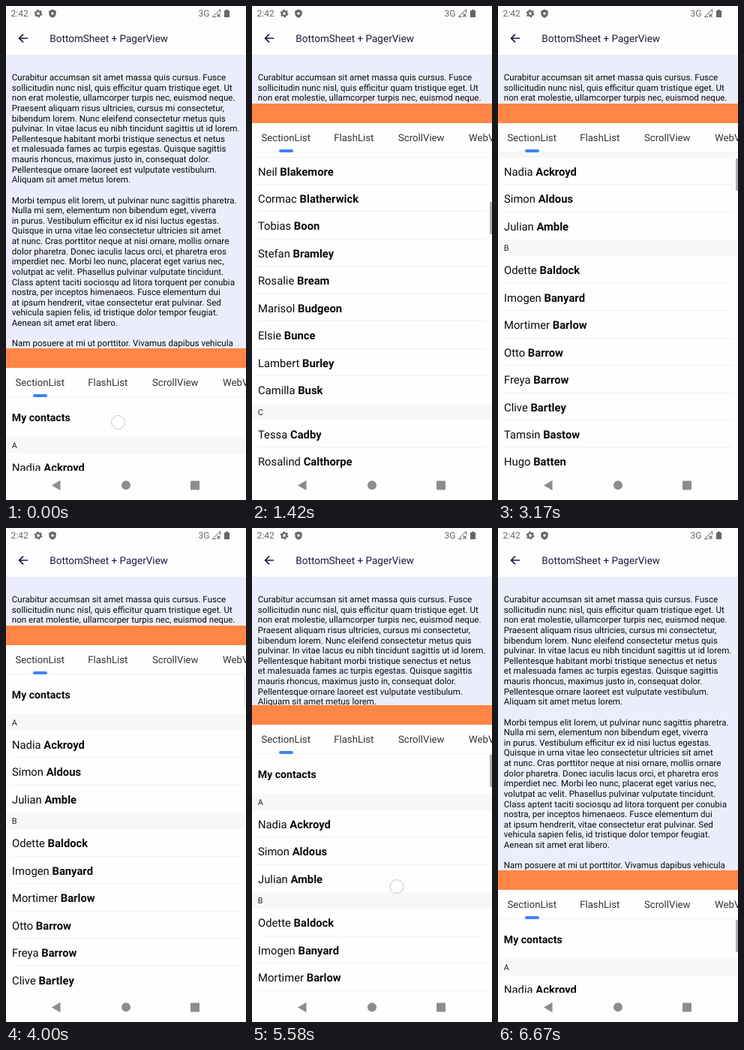
These frames come from a looping animation (320 by 658 pixels, 6.83 s). An HTML page:

```html
<!DOCTYPE html>
<html lang="en">
<head>
<meta charset="utf-8">
<title>BottomSheet + PagerView</title>
<style>
  html, body { margin: 0; width: 100%; height: 100%; overflow: hidden; background: #fefefe; }
  body { font-family: Roboto, sans-serif; color: #0a0a0a; text-rendering: geometricPrecision; }
  #stage { position: relative; width: 320px; height: 658px; overflow: hidden; }
  #stage > * { position: absolute; left: 0; }
  #top { top: 0; width: 320px; height: 65px; background: #fdfdfe; border-bottom: 1px solid #e9e9f3; }
  #page { top: 66px; width: 320px; height: 553px; background: #ebedfc; }
  #lorem { position: absolute; left: 7.8px; top: 23px; font-size: 11.6px; line-height: 13.62px; white-space: pre; }
  #sheet { top: 0; width: 320px; height: 619px; background: #fefefe; }
  #grip { height: 26px; background: #ff8645; }
  #tabs { position: relative; height: 38px; border-bottom: 1px solid #f0f0f0; }
  #tabs span { position: absolute; top: 0; line-height: 42px; font-size: 13.2px; color: #333; white-space: nowrap; }
  #tabs i { position: absolute; left: 36px; top: 35px; width: 19px; height: 4px; border-radius: 2px; background: #3c83f6; }
  #view { position: relative; height: 424px; overflow: hidden; }
  #list { position: absolute; left: 0; top: 0; width: 320px; }
  #list div { box-sizing: border-box; white-space: pre; }
  .title { height: 53px; padding-left: 7.8px; font: bold 14.1px/56px Roboto, sans-serif; }
  .letter { height: 22px; padding-left: 7.8px; background: #f7f7f7; font-size: 10.9px; line-height: 23px; color: #222; }
  .row { height: 36.45px; margin: 0 7px 0 8px; font-size: 14.8px; line-height: 38.4px; }
  .row.line { border-bottom: 1px solid #efefef; }
  #thumb { position: absolute; right: 0; top: 1px; width: 3px; height: 43px; background: #b0b0b0; }
  #nav { top: 619px; width: 320px; height: 39px; background: #fefefe; }
  #touch { top: 0; width: 17px; height: 17px; margin: -10px; border: 1.5px solid #c4c4de; border-radius: 50%; background: rgba(255, 255, 255, .55); }
  svg { display: block; }
</style>
</head>
<body>
<div id="stage">
  <div id="page"><div id="lorem">Curabitur accumsan sit amet massa quis cursus. Fusce
sollicitudin nunc nisl, quis efficitur quam tristique eget. Ut
non erat molestie, ullamcorper turpis nec, euismod neque.
Praesent aliquam risus ultricies, cursus mi consectetur,
bibendum lorem. Nunc eleifend consectetur metus quis
pulvinar. In vitae lacus eu nibh tincidunt sagittis ut id lorem.
Pellentesque habitant morbi tristique senectus et netus
et malesuada fames ac turpis egestas. Quisque sagittis
mauris rhoncus, maximus justo in, consequat dolor.
Pellentesque ornare laoreet est vulputate vestibulum.
Aliquam sit amet metus lorem.

Morbi tempus elit lorem, ut pulvinar nunc sagittis pharetra.
Nulla mi sem, elementum non bibendum eget, viverra
in purus. Vestibulum efficitur ex id nisi luctus egestas.
Quisque in urna vitae leo consectetur ultricies sit amet
at nunc. Cras porttitor neque at nisi ornare, mollis ornare
dolor pharetra. Donec iaculis lacus orci, et pharetra eros
imperdiet nec. Morbi leo nunc, placerat eget varius nec,
volutpat ac velit. Phasellus pulvinar vulputate tincidunt.
Class aptent taciti sociosqu ad litora torquent per conubia
nostra, per inceptos himenaeos. Fusce elementum dui
at ipsum hendrerit, vitae consectetur erat pulvinar. Sed
vehicula sapien felis, id tristique dolor tempor feugiat.
Aenean sit amet erat libero.

Nam posuere at mi ut porttitor. Vivamus dapibus vehicula</div></div>

  <div id="sheet">
    <div id="grip"></div>
    <div id="tabs">
      <span style="left:12.5px">SectionList</span>
      <span style="left:109.2px">FlashList</span>
      <span style="left:195px">ScrollView</span>
      <span style="left:289px">WebView</span>
      <i></i>
    </div>
    <div id="view"><div id="list"></div><div id="thumb"></div></div>
  </div>

  <div id="top">
    <svg width="320" height="65" font-family="Roboto, sans-serif">
      <g fill="#666" font-size="12">
        <text x="6.5" y="14.3">2:42</text>
        <text x="256.5" y="14.3">3G</text>
      </g>
      <g fill="none" stroke="#666">
        <circle cx="43" cy="10" r="3" stroke-width="2.2"/>
        <circle cx="43" cy="10" r="4.6" stroke-width="1.6" stroke-dasharray="2.4 2.42"/>
        <path d="M275.5 14.5 L285.5 4.5 V9 M275.5 14.5 H280"/>
        <path d="M281.5 10.5 l4 4 m0 -4 l-4 4" stroke-width="1.1"/>
      </g>
      <path d="M62 4.5 L66.7 6.4 V10 Q66.7 14 62 15.7 Q57.3 14 57.3 10 V6.4 Z" fill="#666"/>
      <circle cx="62" cy="10" r="1.8" fill="#fdfdfe"/>
      <path d="M291 6 h2 v-1.3 h3 v1.3 h2 v9 h-7 Z" fill="#666"/>
      <path d="M29 43 H18 M23 37.7 L17.6 43 L23 48.3" fill="none" stroke="#1a1a3c" stroke-width="1.7"/>
      <text x="58.3" y="47.9" font-size="13.55" fill="#1a1a3c">BottomSheet + PagerView</text>
    </svg>
  </div>

  <div id="nav">
    <svg width="320" height="39" fill="#8c8c8c">
      <path d="M61 19.5 L72.5 12.8 V26.2 Z"/>
      <circle cx="160" cy="19.3" r="6"/>
      <rect x="246" y="13.5" width="12" height="12" rx=".8"/>
    </svg>
  </div>
  <div id="touch"></div>
</div>

<script>
const LOOP = 6830, STEP = 1000 / 12;
const CONTENT = 4181, VIEW = 424;
const OPEN = 130, CLOSED = 456, DRAG_SPEED = .182;
const DRAG_START = 5000, RELEASE = 6420;
const $ = id => document.getElementById(id);

const contacts = {
  A: 'Nadia Ackroyd,Simon Aldous,Julian Amble',
  B: 'Odette Baldock,Imogen Banyard,Mortimer Barlow,Otto Barrow,Freya Barrow,Clive Bartley,' +
     'Tamsin Bastow,Hugo Batten,Cora Beadle,Felix Beckwith,Ines Bellamy,Roland Birkett,' +
     'Neil Blakemore,Cormac Blatherwick,Tobias Boon,Stefan Bramley,Rosalie Bream,' +
     'Marisol Budgeon,Elsie Bunce,Lambert Burley,Camilla Busk',
  C: 'Tessa Cadby,Rosalind Calthorpe,Louisa Chantry,Mavis Cheal,Dirk Clement,Petra Colby,' +
     'Kurt Crane,Theodore Croker',
  D: 'Boris Dabney,Honor Dibb,Una Doddridge',
  E: 'Garth Eland,Nolan Everley'
};

let html = '<div class="title">My contacts</div>';
for (const [letter, names] of Object.entries(contacts)) {
  html += `<div class="letter">${letter}</div>`;
  names.split(',').forEach((name, i, all) => {
    const [first, last] = name.split(' ');
    html += `<div class="row${i < all.length - 1 ? ' line' : ''}">${first} <b>${last}</b></div>`;
  });
}
$('list').innerHTML = html;

const progress = (t, start, end) => Math.min(1, Math.max(0, (t - start) / (end - start)));
const easeOut = x => 1 - (1 - x) ** 3;
const easeInOut = x => x * x * (3 - 2 * x);
const mix = (a, b, x) => a + (b - a) * x;

// Each flick: the finger drags the list, then it glides to rest
const flicks = [
  { down: 1000, start: 917, end: 1750, by: 681, x: 150, y: 560 },
  { down: 1750, start: 1667, end: 2333, by: 389, x: 150, y: 540 },
  { down: 2583, start: 2667, end: 3500, by: -1070, x: 153, y: 220 }
];
const travel = (f, t) => f.by * easeOut(progress(t, f.start, f.end));
const scrollAt = t => flicks.reduce((sum, f) => sum + travel(f, t), 0);

function sheetAt(t) {
  if (t < DRAG_START) return mix(CLOSED, OPEN, easeInOut(progress(t, 0, 417)));
  const dragged = OPEN + DRAG_SPEED * (Math.min(t, RELEASE) - DRAG_START);
  return mix(dragged, CLOSED, easeInOut(progress(t, RELEASE, 6667)));
}

function touchAt(t) {
  if (t < 200) return [150, sheetAt(t) + 99];
  if (t >= 4580 && t <= RELEASE) return [193.5, sheetAt(t) + 242];
  const f = flicks.find(f => t >= f.down && t < f.start + 200);
  return f && [f.x, f.y - travel(f, t)];
}

// The scroll thumb shows on touch and fades once the list rests
function thumbAlpha(t) {
  if (t >= 4580) return 1;
  if (t >= 960) return Math.max(.2, 1 - progress(t, 3750, 4050));
  return t > 100 ? 1 - progress(t, 420, 720) : 0;
}

const move = (id, x, y) => { $(id).style.transform = `translate(${x}px, ${y}px)`; };

function draw(ms) {
  const t = Math.round(Math.floor((ms % LOOP + 4) / STEP) * STEP);
  const y = scrollAt(t);
  move('sheet', 0, Math.round(sheetAt(t)));
  move('list', 0, -Math.round(y));
  move('thumb', 0, Math.round(y * VIEW / CONTENT));
  $('thumb').style.opacity = thumbAlpha(t);

  const touch = touchAt(t);
  $('touch').style.visibility = touch ? 'visible' : 'hidden';
  if (touch) move('touch', ...touch);
}

const start = performance.now();
function tick() {
  draw(performance.now() - start);
  requestAnimationFrame(tick);
}
tick();
</script>
</body>
</html>
```
